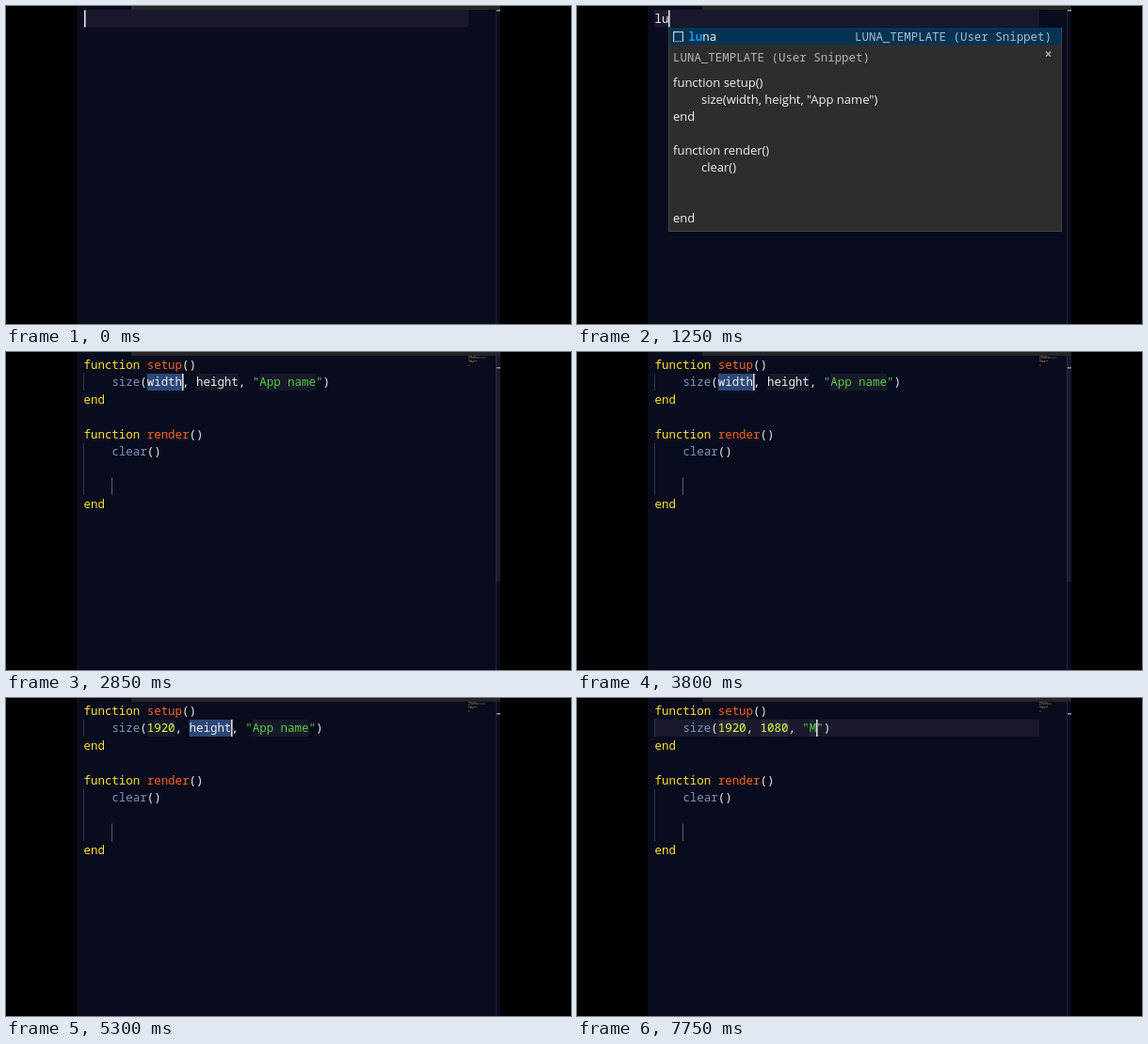
Animation, 600 px wide and 338 px high, one loop 8000 ms. Source, as an HTML page with a canvas:

```html
<!DOCTYPE html>
<html lang="en">
<head>
<meta charset="utf-8">
<title>Snippet typing</title>
<style>
  html, body { margin: 0; width: 100%; height: 100%; overflow: hidden; background: #000; }
  canvas { display: block; width: 600px; height: 338px; }
</style>
</head>
<body>
<canvas id="stage" width="600" height="338"></canvas>
<script>
const ctx = document.getElementById('stage').getContext('2d');
const LOOP = 8000;
const CHAR = 7.47, ROW = 18.5, LEFT = 82.5, TOP = 4;
const MONO = '12.45px "Noto Sans Mono", "DejaVu Sans Mono", monospace';
const SANS = '13px "Open Sans", "Noto Sans", sans-serif';
const C = {
  bg: '#090c1d', line: '#181a2b', plain: '#ececec', key: '#ffe02e', name: '#f5651f',
  call: '#7d93bd', num: '#e4ff4a', str: '#5bcb46', select: '#2c4777',
  stop: 'rgba(124,124,124,0.11)', guide: '#303446', match: '#0f96f2', dim: '#b4b4b6'
};

// Moments of the typing
const TYPE_WORD = [750, 1100, 1400, 1700];
const POPUP_LIST = 800, POPUP_ONE = 1200, ACCEPT = 2750;
const TYPE_WIDTH = [4150, 4350, 4550, 4700];
const TAB_HEIGHT = 4950;
const TYPE_HEIGHT = [5850, 6200, 6500, 6750];
const TAB_TITLE = 7150, TYPE_TITLE = [7550];
// Caret off / on again
const BLINKS = [[50, 300], [2000, 2300], [3350, 3600], [5350, 5500]];

const typed = (word, times, t) => word.slice(0, times.filter(m => t >= m).length);
const ramp = (t, from, len) => Math.min(1, Math.max(0, (t - from) / len));
const colX = col => LEFT + col * CHAR;
const rowY = row => TOP + row * ROW;

function rect(x, y, w, h, color) {
  ctx.fillStyle = color;
  ctx.fillRect(x, y, w, h);
}

function text(str, x, mid, color, font = MONO) {
  ctx.font = font;
  ctx.fillStyle = color;
  ctx.fillText(str, x, mid + 4.5);
}

function caretAlpha(t) {
  let a = 1;
  for (const [off, on] of BLINKS) a -= ramp(t, off, 100) - ramp(t, on, 100);
  return a;
}

function caret(col, row, t) {
  ctx.globalAlpha = caretAlpha(t);
  rect(Math.round(colX(col)), rowY(row) + 0.5, 1.6, ROW - 0.5, '#dddddd');
  ctx.globalAlpha = 1;
}

function frame(markY) {
  rect(0, 0, 600, 338, '#000');
  rect(75, 0, 450, 338, C.bg);
  rect(133, 0, 392, 4, '#252526');
  rect(520, 4, 1, 334, '#20233a');
  rect(521, markY, 4, 1.6, '#8d8d92');
}

function lineBox(row) {
  rect(82, rowY(row), 409, ROW, C.line);
}

function icon(x, mid) {
  const l = Math.round(x), t = Math.round(mid - 5);
  rect(l, t, 11, 1.2, '#c8c8c8');
  rect(l, t, 1.2, 10, '#c8c8c8');
  rect(l + 9.8, t, 1.2, 10, '#c8c8c8');
  for (let i = 0; i < 5; i++) rect(l + i * 2.45, t + 10, 1.3, 1.2, '#c8c8c8');
}

function cross(x, y) {
  ctx.strokeStyle = '#b8b8b8';
  ctx.lineWidth = 1.3;
  ctx.beginPath();
  ctx.moveTo(x - 2.5, y - 2.5); ctx.lineTo(x + 2.5, y + 2.5);
  ctx.moveTo(x + 2.5, y - 2.5); ctx.lineTo(x - 2.5, y + 2.5);
  ctx.stroke();
}

function panel(x, bottom) {
  rect(x, 23, 418, bottom - 23, '#2d2d2f');
  ctx.strokeStyle = '#424245';
  ctx.lineWidth = 1;
  ctx.strokeRect(x + 0.5, 23.5, 417, bottom - 24);
  rect(x + 1, 23, 416, 18, '#043353');
}

function option(word, hit, x, mid) {
  icon(x + 5, mid);
  text(word.slice(0, hit), x + 21.3, mid, C.match, '600 ' + MONO);
  text(word.slice(hit), x + 21.3 + hit * CHAR, mid, '#f2f2f2');
}

function listPopup() {
  const x = 90, sign = 'load (func [, chunkname]) (Lua)', versions = '5.1,5.2,5.3';
  panel(x, 206);
  rect(x + 1, 41, 416, 73, '#272729');
  rect(x + 1, 114, 416, 1, '#424245');
  ['load', 'loadfile', 'loadstring', 'local', 'luna']
    .forEach((word, i) => option(word, 1, x, 32 + i * ROW));
  text(versions + ' ' + sign, 176, 32, '#a9bccb');
  text(versions, 95.5, 128, C.dim);
  text(sign, 95.5, 164, C.dim);
  text('load(...)', 95.5, 190.5, C.plain, SANS);
  cross(493.5, 124.5);
}

function snippetPopup(hit) {
  const x = 97, title = 'LUNA_TEMPLATE (User Snippet)';
  panel(x, 240);
  option('luna', hit, x, 32);
  text(title, 295, 32, '#a9bccb');
  text(title, 102, 54.5, C.dim);
  cross(500.5, 51);
  const doc = [
    'function setup()', '\tsize(width, height, "App name")', 'end', '',
    'function render()', '\tclear()', '', '', 'end'
  ];
  doc.forEach((s, i) =>
    text(s.trim(), s[0] === '\t' ? 132 : 102, 81 + i * 18, '#f0f0f0', SANS));
}

function wordScene(t) {
  const word = typed('luna', TYPE_WORD, t);
  frame(4);
  lineBox(0);
  text(word, LEFT, 13, C.plain);
  caret(word.length, 0, t);
  if (t >= POPUP_ONE) snippetPopup(word.length);
  else if (t >= POPUP_LIST) listPopup();
}

// Each argument: value, whether it is selected, caret column inside it
function args(t) {
  const w = t < TYPE_WIDTH[0] ? 'width' : typed('1920', TYPE_WIDTH, t);
  const h = t < TYPE_HEIGHT[0] ? 'height' : typed('1080', TYPE_HEIGHT, t);
  const n = t < TYPE_TITLE[0] ? 'App name' : typed('M', TYPE_TITLE, t);
  const active = t < TAB_HEIGHT ? 0 : t < TAB_TITLE ? 1 : 2;
  const selected = t < [TYPE_WIDTH, TYPE_HEIGHT, TYPE_TITLE][active][0];
  return { w, h, n, active, selected };
}

function codeRows(a) {
  const value = v => [v, /\d/.test(v) ? C.num : C.plain];
  const head = name => [['function ', C.key], [name, C.name], ['()', C.plain]];
  return [
    head('setup'),
    [['    ', C.plain], ['size', C.call], ['(', C.plain], value(a.w), [', ', C.plain],
     value(a.h), [', ', C.plain], ['"' + a.n + '"', C.str], [')', C.plain]],
    [['end', C.key]],
    [],
    head('render'),
    [['    ', C.plain], ['clear', C.call], ['()', C.plain]],
    [], [],
    [['end', C.key]]
  ];
}

function minimap(rows) {
  ctx.globalAlpha = 0.5;
  rows.forEach((parts, r) => {
    let col = 0;
    for (const [s, color] of parts) {
      const len = s.trimEnd().length;
      if (len) rect(491 + col * 0.52, 4.5 + r * 1.15, len * 0.52, 0.8, color);
      col += s.length;
    }
  });
  ctx.globalAlpha = 1;
}

function codeScene(t) {
  const a = args(t), rows = codeRows(a);
  frame(16);
  const slider = 1 - ramp(t, 3850, 100);
  rect(520, 4, 5, 240, `rgba(100,105,130,${0.16 * slider})`);
  if (!a.selected) lineBox(1);

  const values = [a.w, a.h, a.n];
  const starts = [9, 11 + a.w.length, 14 + a.w.length + a.h.length];
  values.forEach((v, i) => {
    const on = a.selected && i === a.active;
    rect(colX(starts[i]), rowY(1) + 0.5, v.length * CHAR, ROW - 0.5, on ? C.select : C.stop);
  });

  rect(82, rowY(1), 1, ROW, C.guide);
  rect(82, rowY(5), 1, ROW * 3, C.guide);
  rect(112, rowY(7), 1, ROW, '#5a5c64');

  rows.forEach((parts, r) => {
    let col = 0;
    for (const [s, color] of parts) {
      text(s, colX(col), 13 + r * ROW, color);
      col += s.length;
    }
  });
  caret(starts[a.active] + values[a.active].length, 1, t);
  minimap(rows);
}

function draw(now) {
  const t = now % LOOP;
  if (t < ACCEPT) wordScene(t);
  else codeScene(t);
  requestAnimationFrame(() => draw(performance.now() - start));
}

const start = performance.now();
draw(0);
</script>
</body>
</html>
```
